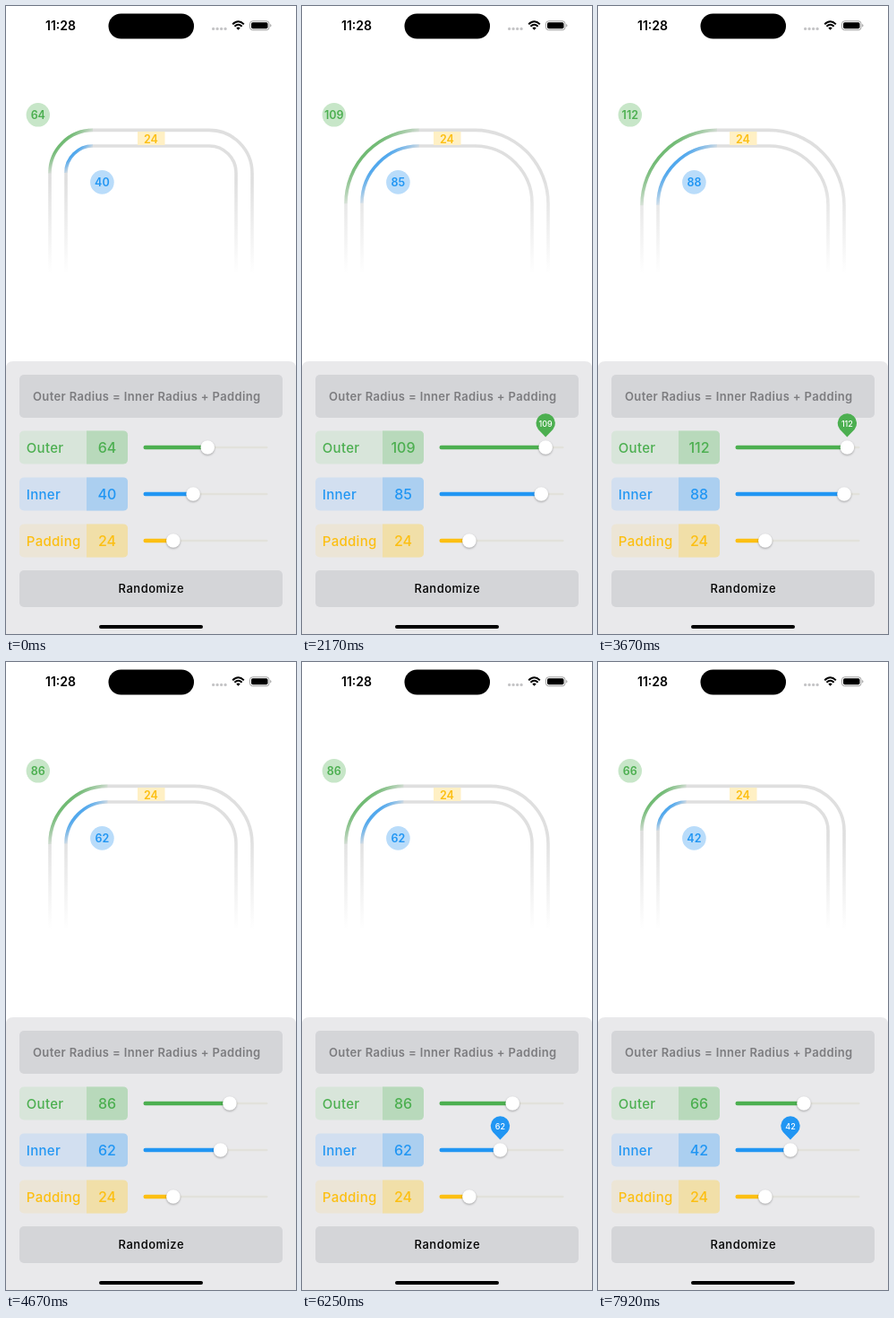
Animation of 324x700 px, one loop 8000 ms. Source, as an HTML page:

```html
<!DOCTYPE html>
<html lang="en">
<head>
<meta charset="utf-8">
<title>Nested corner radius</title>
<style>
  html, body { margin: 0; width: 100%; height: 100%; overflow: hidden; background: #fff; }
  svg { display: block; width: 100vw; height: 100vh; }
  text { font-family: Inter, Roboto, sans-serif; font-weight: 500; }
  .mid { text-anchor: middle; }
  .badge { font-size: 12.5px; font-weight: 600; }
  .label { font-size: 15px; letter-spacing: .3px; }
  .value { font-size: 16px; }
  .frame { fill: none; stroke: url(#fade); stroke-width: 3.6; }
  .arc { fill: none; stroke-width: 3.6; }
  .thumb { fill: #fff; filter: drop-shadow(0 1px 1.2px rgba(0, 0, 0, .3)); }
  .green { fill: #4caf50; }
  .blue { fill: #2196f3; }
  .amber { fill: #fcbf12; }
</style>
</head>
<body>
<svg viewBox="0 0 324 700" preserveAspectRatio="none">
  <defs>
    <linearGradient id="fade" gradientUnits="userSpaceOnUse" x1="0" y1="138" x2="0" y2="298">
      <stop offset=".35" stop-color="#dfdfdf"/>
      <stop offset="1" stop-color="#dfdfdf" stop-opacity="0"/>
    </linearGradient>
    <linearGradient id="greenArc" x2=".5" y2=".5">
      <stop offset=".6" stop-color="#4caf50" stop-opacity=".75"/>
      <stop offset="1" stop-color="#4caf50" stop-opacity=".1"/>
    </linearGradient>
    <linearGradient id="blueArc" x2=".5" y2=".5">
      <stop offset=".6" stop-color="#2196f3" stop-opacity=".75"/>
      <stop offset="1" stop-color="#2196f3" stop-opacity=".1"/>
    </linearGradient>
    <filter id="soft" x="-50%" y="-50%" width="200%" height="200%"><feGaussianBlur stdDeviation="2.5"/></filter>
  </defs>

  <!-- status bar -->
  <text x="61" y="27" class="mid" font-size="14" style="font-weight:600">11:28</text>
  <rect x="114.5" y="8.5" width="95.5" height="28" rx="14"/>
  <g fill="#c4c4c6">
    <circle cx="231.6" cy="25.4" r="1.6"/><circle cx="236.1" cy="25.4" r="1.6"/>
    <circle cx="240.6" cy="25.4" r="1.6"/><circle cx="245.1" cy="25.4" r="1.6"/>
  </g>
  <g fill="none" stroke="#000" stroke-width="2">
    <path d="M253.2 20.4Q259.5 14.2 265.8 20.4M255.4 22.8Q259.5 18.8 263.6 22.8"/>
    <path d="M257.3 24.4Q259.5 22.6 261.7 24.4L259.5 26.8Z" fill="#000" stroke="none"/>
  </g>
  <rect x="272.5" y="16.8" width="21.5" height="10" rx="3" fill="none" stroke="#a0a0a0"/>
  <rect x="274" y="18.3" width="18.5" height="7" rx="1.7"/>
  <path d="M295.2 20v3.6q1.3-.5 1.3-1.8t-1.3-1.8" fill="#a0a0a0"/>

  <!-- nested frames -->
  <path id="outerFrame" class="frame"/>
  <path id="innerFrame" class="frame"/>
  <path id="outerArc" class="arc" stroke="url(#greenArc)"/>
  <path id="innerArc" class="arc" stroke="url(#blueArc)"/>
  <rect x="147" y="140" width="30.5" height="15" fill="#fff0c4"/>
  <text x="162" y="152.6" class="mid badge amber">24</text>
  <circle cx="35.8" cy="121.3" r="13.2" fill="#c7e6c8"/>
  <text x="35.8" y="125.9" class="mid badge green" data-show="outer"></text>
  <circle cx="107.4" cy="196.4" r="13.3" fill="#b9dcfa"/>
  <text x="107.4" y="201" class="mid badge blue" data-show="inner"></text>

  <!-- control panel -->
  <path d="M0 700V404q0-8 8-8H316q8 0 8 8V700Z" fill="#e9e9eb"/>
  <rect x="15" y="411" width="294" height="48" rx="5" fill="#d4d5d8"/>
  <text x="30" y="439.7" font-size="13" letter-spacing=".36" fill="#7c7c7f" style="font-weight:600">Outer Radius = Inner Radius + Padding</text>
  <g id="rows"></g>
  <rect x="15" y="629" width="294" height="41" rx="5" fill="#d4d5d8"/>
  <text x="162.3" y="654.4" class="mid" font-size="13" letter-spacing=".5">Randomize</text>
  <rect x="104" y="690" width="116" height="4" rx="2"/>
</svg>
<script>
const LOOP = 8000, LAG = 90, PADDING = 24, SCALE = 0.75;
const TRACK_X = 153.5, TRACK_W = 139;
const $ = id => document.getElementById(id);
const clamp = x => Math.min(1, Math.max(0, x));

const rows = [
  { id: 'outer', name: 'Outer', color: 'green', y: 492, max: 124, tint: '#d8e5da', fill: '#b8d9bb' },
  { id: 'inner', name: 'Inner', color: 'blue', y: 544, max: 100, tint: '#d2dff0', fill: '#abcff0' },
  { id: 'padding', name: 'Padding', color: 'amber', y: 596, max: 100, tint: '#ece5d6', fill: '#f1dfa8' }
];

$('rows').innerHTML = rows.map(({ id, name, color, y, tint, fill }) => `
  <rect x="15" y="${y - 18.5}" width="121" height="37" rx="5" fill="${tint}"/>
  <path d="M90 ${y - 18.5}h41q5 0 5 5v27q0 5-5 5h-41z" fill="${fill}"/>
  <text x="22.8" y="${y + 5.5}" class="label ${color}">${name}</text>
  <text x="113" y="${y + 5.8}" class="mid value ${color}" data-show="${id}"></text>
  <rect x="${TRACK_X}" y="${y - 1.3}" width="${TRACK_W}" height="2.6" rx="1.3" fill="#e2e1db"/>
  <rect id="${id}Bar" x="${TRACK_X}" y="${y - 2.2}" height="4.4" rx="2.2" class="${color}"/>
  <g id="${id}Thumb">
    <circle id="${id}Halo" cy="1" r="11" fill="#9fada0" filter="url(#soft)"/>
    <circle r="7.8" class="thumb"/>
    <g id="${id}Pin">
      <path d="M0 0L-8.2-8.6A10.7 10.7 0 1 1 8.2-8.6Z" class="${color}"/>
      <text y="-12" class="mid" font-size="9" fill="#fff" data-show="${id}"></text>
    </g>
  </g>`).join('');

// inner slider over time: [ms, value]
const keys = [
  [0, 40], [1250, 40], [1330, 45], [1420, 43.8], [2000, 86], [2740, 42], [2830, 36],
  [3010, 28], [3600, 88], [4400, 62], [5170, 62], [5800, 80], [6160, 62], [6250, 49],
  [6450, 28], [6900, 80], [7080, 62], [7170, 51], [7400, 28], [7830, 42.2], [7920, 44.2], [8000, 45]
];

// slope at a key, flat at turning points
function slope(i) {
  const a = keys[i - 1], b = keys[i], c = keys[i + 1];
  if (!a || !c || (b[1] - a[1]) * (c[1] - b[1]) <= 0) return 0;
  return (c[1] - a[1]) / (c[0] - a[0]);
}

function valueAt(t) {
  const i = Math.max(1, keys.findIndex(k => k[0] >= t));
  const [t0, v0] = keys[i - 1], [t1, v1] = keys[i];
  const d = t1 - t0, u = clamp((t - t0) / d), w = 1 - u;
  return v0 * (1 + 2 * u) * w * w + slope(i - 1) * d * u * w * w
       + v1 * (3 - 2 * u) * u * u - slope(i) * d * u * u * w;
}

const pulse = (t, on, off) => clamp((t - on) / 200) * clamp((off - t) / 150);

function drawFrame(id, left, right, top, r) {
  const corner = `V${top + r}A${r} ${r} 0 0 1 ${left + r} ${top}`;
  $(id + 'Frame').setAttribute('d',
    `M${left} 298${corner}H${right - r}A${r} ${r} 0 0 1 ${right} ${top + r}V298`);
  $(id + 'Arc').setAttribute('d', `M${left} ${top + r}A${r} ${r} 0 0 1 ${left + r} ${top}`);
}

function render(t) {
  const live = valueAt(t), shown = valueAt(Math.max(0, t - LAG));
  const pos = { outer: live + PADDING, inner: live, padding: PADDING };
  const text = { outer: Math.round(shown) + PADDING, inner: Math.round(shown), padding: PADDING };
  const pin = { outer: pulse(t, 1290, 4500), inner: pulse(t, 5170, 9000), padding: 0 };

  for (const { id, y, max } of rows) {
    const dx = TRACK_W * pos[id] / max, p = pin[id];
    $(id + 'Bar').setAttribute('width', dx);
    $(id + 'Thumb').setAttribute('transform', `translate(${TRACK_X + dx} ${y})`);
    $(id + 'Halo').setAttribute('opacity', 2 * p * (1 - p));
    $(id + 'Pin').setAttribute('transform', `translate(0 -11.5) scale(${p})`);
    $(id + 'Pin').setAttribute('visibility', p ? 'visible' : 'hidden');
  }
  document.querySelectorAll('[data-show]').forEach(el => { el.textContent = text[el.dataset.show]; });

  drawFrame('outer', 49, 275, 138.4, (shown + PADDING) * SCALE);
  drawFrame('inner', 67, 257, 156, shown * SCALE);
}

const start = performance.now();
function tick() {
  render((performance.now() - start) % LOOP);
  requestAnimationFrame(tick);
}
tick();
</script>
</body>
</html>
```
